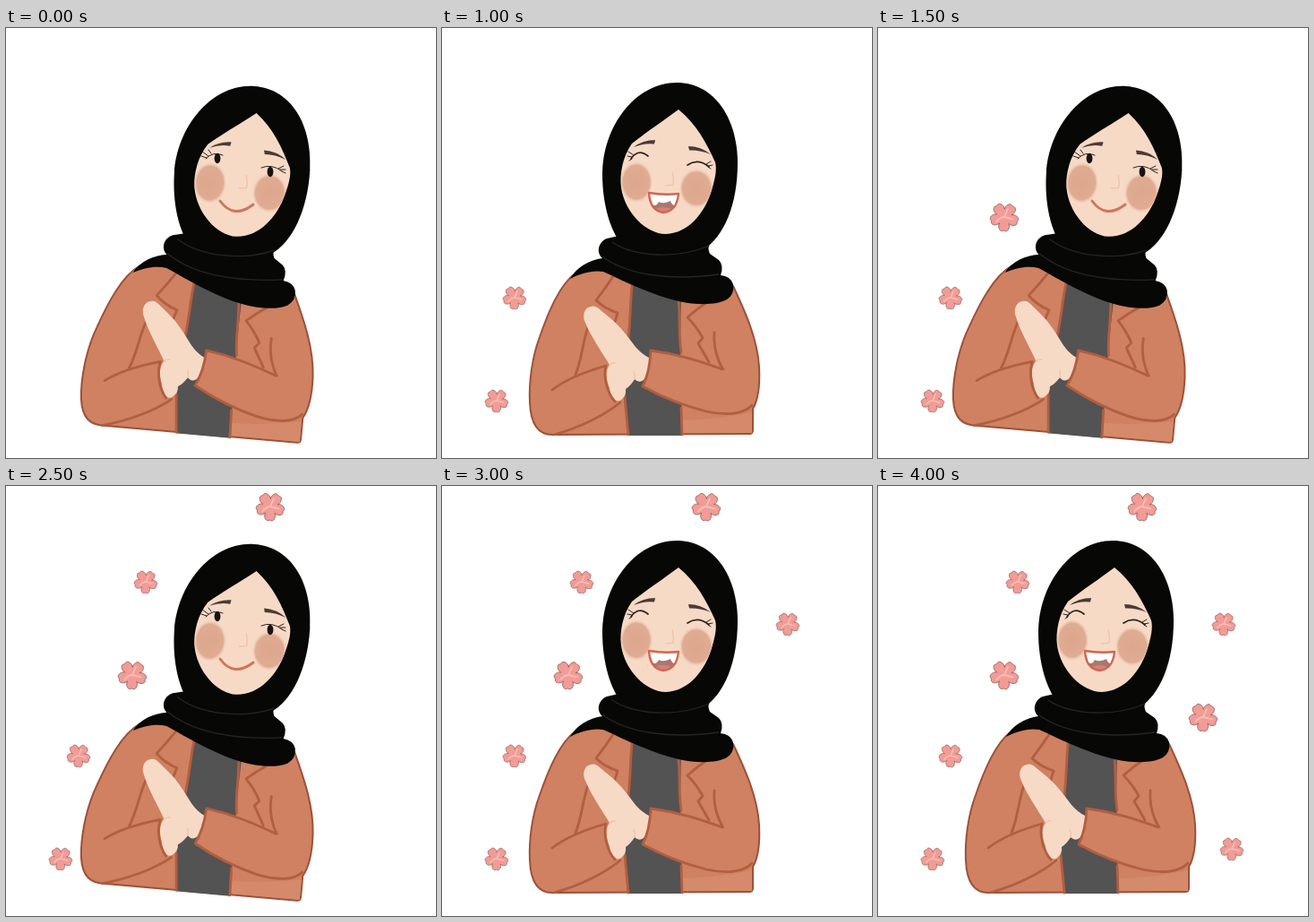
Write an HTML page that moves like this. It is 480 by 480 pixels and loops after 4.5 s.

```html
<!DOCTYPE html>
<html lang="en">
<head>
<meta charset="utf-8">
<title>Clapping with flowers</title>
<style>
  html, body { margin: 0; width: 100%; height: 100%; overflow: hidden; background: #fff; }
  svg { display: block; width: 100vw; height: 100vh; }
  .line { fill: none; stroke: #b15e41; stroke-width: 2.8; }
  .skin { fill: #f7dac6; }
  .cloth { fill: #cf8161; }
  .black { fill: #070706; }
  .fold { fill: none; stroke: #252525; stroke-width: 1.3; }
  .ink { fill: none; stroke: #2c211f; stroke-width: 1.7; }
  .lash { fill: none; stroke: #2c211f; stroke-width: 1; }
  .brow { fill: #4b3a37; }
  .nose { fill: none; stroke: #eec5ae; stroke-width: 1.4; }
</style>
</head>
<body>
<svg viewBox="0 0 480 480" stroke-linecap="round" stroke-linejoin="round">
  <defs>
    <radialGradient id="blush">
      <stop offset="0" stop-color="#dca68c"/>
      <stop offset=".78" stop-color="#dfab92"/>
      <stop offset="1" stop-color="#f7dac6" stop-opacity="0"/>
    </radialGradient>
    <path id="faceShape" d="M264 91C248 103 227 117 212 129C202 143 198 162 200 178C204 206 228 230 250 230C276 229 294 205 301 181C305 168 307 158 305 150C295 128 284 107 264 91Z"/>
    <clipPath id="faceClip"><use href="#faceShape"/></clipPath>
    <path id="mouthShape" d="M231 184Q248 187 264 185Q262 205 247 206Q232 204 231 184Z"/>
    <clipPath id="mouthClip"><use href="#mouthShape"/></clipPath>
  </defs>

  <g id="body">
    <path class="cloth" stroke="#9c513a" stroke-width="2" d="M150 273C131 286 118 319 109 345C100 369 97 397 98 418C99 443 108 454 123 454L343 453Q347 453 347 449V425C353 415 355 397 354 378C352 347 339 318 325 288L240 262L185 260L170 264Z"/>
    <path fill="#d58b6b" d="M269 438Q310 437 346 429V452H269Z"/>
    <path fill="#535354" d="M212 278L267 300L266 340L268 455H207L204 400L209 340Z"/>
    <g class="line">
      <path d="M213 280C210 300 211 320 208 346M204 412L208 454M264 304C266 325 264 345 267 362M267 424L268 454"/>
      <path d="M192 276Q182 291 172 304Q181 313 196 318L193 328"/>
      <path d="M296 306Q284 314 274 323Q284 333 291 346L286 352L298 373"/>
      <path d="M163 334C157 350 156 371 149 387M304 340C302 364 313 382 324 397"/>
    </g>
    <path class="skin" d="M166 311C159 312 156 321 160 329C166 344 178 361 187 376C182 383 183 392 187 402C188 414 196 420 201 414Q206 410 205 403Q211 399 215 392Q220 397 225 393L232 382L231 368Q223 364 216 356C207 344 198 332 188 324Q182 319 177 315Q171 309 166 311Z"/>
    <path class="nose" d="M187 377Q189 373 193 374M215 392Q216 388 214 384"/>
    <path class="line" d="M123 404C140 391 162 383 183 377C180 389 184 407 193 417M125 454C154 446 182 432 199 418"/>
    <path class="cloth" d="M233 360C264 364 288 373 316 382L348 407C334 435 317 433 295 428C267 421 244 411 224 400Q231 384 233 360Z"/>
    <path class="line" d="M313 381C288 372 264 364 233 360Q232 384 224 400C244 411 267 421 295 428C318 433 337 431 346 421"/>
  </g>

  <g id="hood">
    <path class="black" d="M262 61C304 61 330 101 330 151C330 196 315 233 292 247L205 247C188 230 179 197 179 163C179 111 215 61 262 61Z"/>
  </g>

  <g id="scarf">
    <path class="black" d="M184 235C174 239 172 251 179 257C164 259 149 268 143 280C154 274 168 270 180 272C206 284 237 299 264 305C287 310 307 309 318 303Q327 297 325 286Q322 277 311 276Q315 265 309 259L299 252Q296 246 299 239L250 220Z"/>
    <path class="fold" d="M190 239C215 256 264 258 298 243M180 256C210 277 258 282 309 275"/>
  </g>

  <g id="face">
    <use class="skin" href="#faceShape"/>
    <g clip-path="url(#faceClip)" fill="url(#blush)">
      <ellipse cx="217" cy="172" rx="19" ry="24"/>
      <ellipse cx="284" cy="179" rx="20" ry="23"/>
    </g>
    <path class="brow" d="M238 125L237 129.500Q226 128 214 133Q224 125 238 125ZM275 132L276 136.500Q288 136 300 141Q289 132 275 132Z"/>
    <path class="nose" d="M257 161Q259 169 258 175L250 176"/>
  </g>

  <g id="laugh">
    <path class="ink" d="M211 146Q219 134 230 143M274 153Q286 145 298 155"/>
    <path class="lash" d="M214 142L208 138M212 144L207 143M212 146L209 148M295 152L300 149M297 154L302 153M297 155L300 157"/>
    <g clip-path="url(#mouthClip)">
      <path fill="#aa7770" d="M228 180H268V210H228Z"/>
      <path fill="#fff" d="M230 182H266L261 198Q257 199 255 193Q247 197 242 194Q239 200 235 197Z"/>
      <ellipse cx="247" cy="205" rx="11" ry="5" fill="#d38078"/>
    </g>
    <use href="#mouthShape" fill="none" stroke="#d2664e" stroke-width="2.400"/>
  </g>

  <g id="smile">
    <g fill="#171313">
      <ellipse cx="236" cy="145.500" rx="3.400" ry="5.700"/>
      <ellipse cx="295" cy="160.500" rx="3.400" ry="5.700"/>
    </g>
    <path class="lash" d="M223 146Q231 137 242 142M285 156Q297 151 308 160"/>
    <path class="lash" d="M226 143L219 138M224 145L218 143M229 140L226 136M304 157L310 154M306 158L312 158M308 160L312 162"/>
    <path fill="none" stroke="#cf7757" stroke-width="3" d="M239 193Q254 214 276 197"/>
  </g>
  <g id="flowers"></g>
</svg>
<script>
const STEP = 500, STEPS = 9;
const byId = id => document.getElementById(id);

// x, y, scale; listed in order of appearance
const flowers = [
  [61, 416, 1], [81, 301, 1], [141, 211, 1.23], [156, 107, 1],
  [295, 23, 1.23], [386, 154, 1], [363, 258, 1.23], [395, 405, 1]
];

// Placement of each part when leaning; upright parts need none
const lean = {
  body: 'translate(25 -20) rotate(5.3)',
  hood: 'translate(9.5 3) rotate(3.5 250 150)',
  scarf: 'translate(-2 0) rotate(4.4 234 287)',
  face: 'translate(12 3) rotate(3.5 250 150)'
};

function petalPath(size) {
  const points = [];
  for (let a = 0; a < 360; a += 3) {
    const t = a * Math.PI / 180;
    const s = Math.abs(Math.sin(2.5 * t));
    const r = size * (0.55 + 0.5 * s ** 0.7 - 0.1 * s ** 16);
    points.push(`${(r * Math.cos(t)).toFixed(1)} ${(r * Math.sin(t)).toFixed(1)}`);
  }
  return `M${points.join('L')}Z`;
}

const petals = petalPath(13);
byId('flowers').innerHTML = flowers.map(([x, y, scale]) => `
  <g transform="translate(${x} ${y}) rotate(-16) scale(${scale})">
    <path d="${petals}" fill="#f19c96" stroke="#8a5551" stroke-width=".6"/>
    <path d="M-8 2Q-3 -1 0 0L5 -6M0 0L7 4" fill="none" stroke="#f7bdb6" stroke-width="1.5"/>
  </g>`).join('');
const flowerNodes = [...byId('flowers').children];

const show = (node, on) => node.setAttribute('visibility', on ? 'visible' : 'hidden');

function draw(step) {
  const laughing = step > 0 && step % 2 === 0;
  for (const id in lean) byId(id).setAttribute('transform', laughing ? '' : lean[id]);
  show(byId('laugh'), laughing);
  show(byId('smile'), !laughing);
  flowerNodes.forEach((node, i) => show(node, i < step));
}

const start = performance.now();
function tick() {
  draw(Math.floor((performance.now() - start) / STEP) % STEPS);
  requestAnimationFrame(tick);
}
tick();
</script>
</body>
</html>
```
